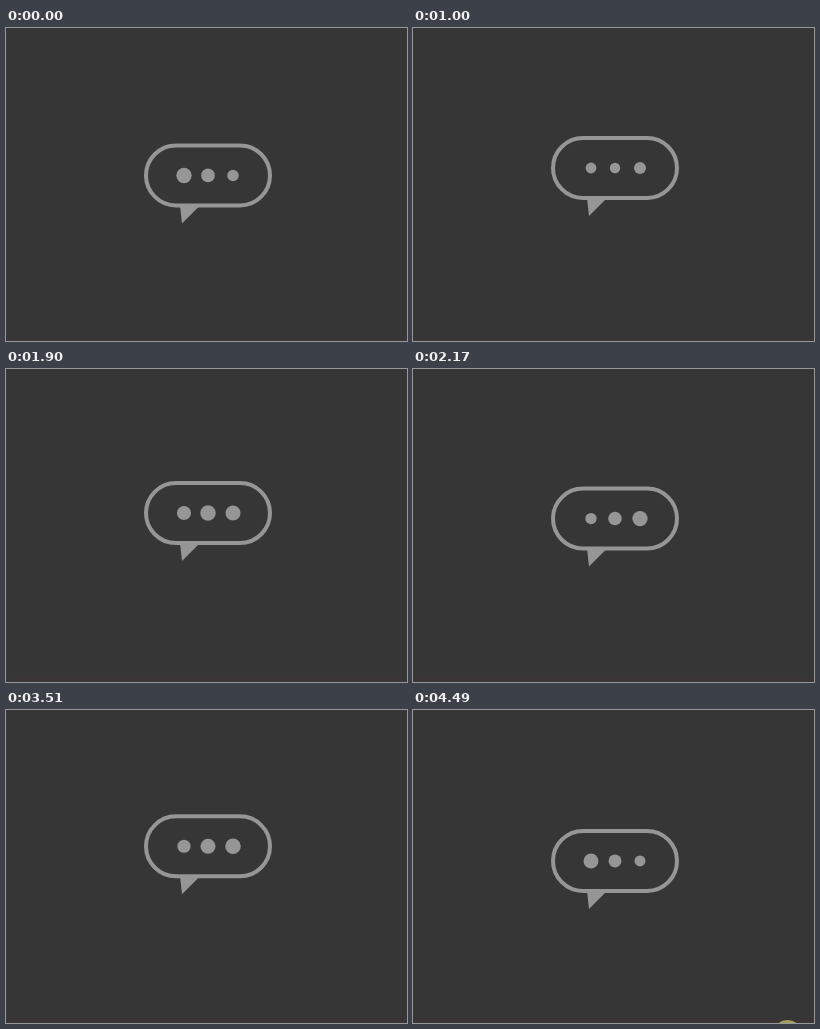
Recreate the animation shown at these times as an HTML page with a canvas. Size 401x313 px, loop 4.56 s.

```html
<!DOCTYPE html>
<html lang="en">
<head>
<meta charset="utf-8">
<title>Typing bubble</title>
<style>
  html, body { margin: 0; width: 100%; height: 100%; overflow: hidden; background: #363636; }
  canvas { display: block; }
</style>
</head>
<body>
<canvas id="stage" width="401" height="313"></canvas>
<script>
const ctx = document.getElementById('stage').getContext('2d');
const LOOP = 4560;
const GREY = '#969696';
const FLOAT = { low: 119, high: 104, half: 1021, lowAt: 352 };
const PULSE = { period: 1520, mid: 6.5, swing: 1.3, peakAt: 105, lag: 213 };
const DOTS = [178, 202, 227];

const easeInOut = x => x < 0.5 ? 2 * x * x : 1 - 2 * (1 - x) ** 2;

function bubbleTop(t) {
  const steps = (t - FLOAT.lowAt) / FLOAT.half + 2;
  const x = steps % 2;
  const rise = easeInOut(x < 1 ? x : 2 - x);
  return FLOAT.low + (FLOAT.high - FLOAT.low) * rise;
}

function dotRadius(t, i) {
  const phase = (t - PULSE.peakAt - i * PULSE.lag) / PULSE.period;
  return PULSE.mid + PULSE.swing * Math.cos(2 * Math.PI * phase);
}

function disc(x, y, r, color) {
  ctx.fillStyle = color;
  ctx.beginPath();
  ctx.arc(x, y, r, 0, 2 * Math.PI);
  ctx.fill();
}

function drawBubble(t) {
  const top = bubbleTop(t);
  ctx.strokeStyle = GREY;
  ctx.lineWidth = 4;
  ctx.beginPath();
  ctx.arc(170, top + 32, 30, Math.PI / 2, Math.PI * 1.5);
  ctx.arc(234, top + 32, 30, -Math.PI / 2, Math.PI / 2);
  ctx.closePath();
  ctx.stroke();

  ctx.fillStyle = GREY;
  ctx.beginPath();
  ctx.moveTo(174, top + 62);
  ctx.lineTo(194, top + 62);
  ctx.lineTo(176, top + 80);
  ctx.closePath();
  ctx.fill();

  DOTS.forEach((x, i) => disc(x, top + 32, dotRadius(t, i), GREY));
}

// Yellow disc that peeks in at the bottom edge
function drawPeek(t) {
  const p = Math.min(1, Math.max(0, (t - 4290) / 120));
  if (p > 0) disc(374.5, 329 - 4 * easeInOut(p), 15, '#a3a05a');
}

function draw(t) {
  ctx.fillStyle = '#363636';
  ctx.fillRect(0, 0, 401, 313);
  ctx.fillStyle = '#3a3537';
  ctx.fillRect(0, 309, 401, 4);
  drawBubble(t);
  drawPeek(t);
}

const start = performance.now();
function tick() {
  draw((performance.now() - start) % LOOP);
  requestAnimationFrame(tick);
}
tick();
</script>
</body>
</html>
```
